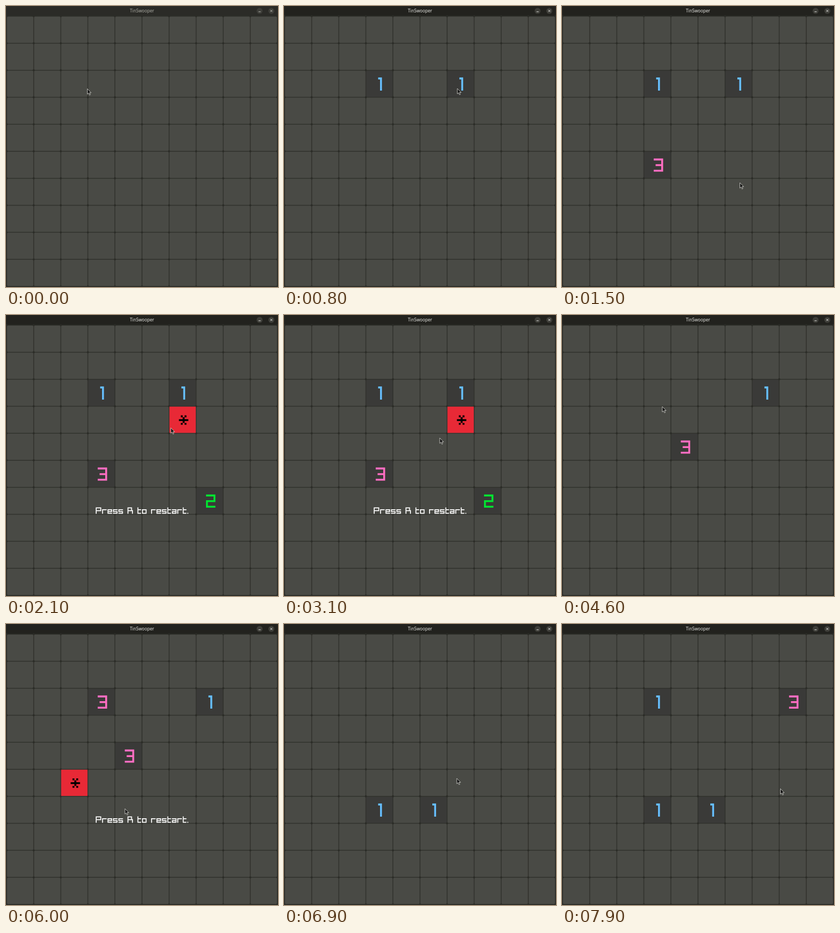
An HTML page for the animation above (8 s loop, 510 px wide and 528 px high).

```html
<!DOCTYPE html>
<html lang="en">
<head>
<meta charset="utf-8">
<title>TinSwooper</title>
<style>
  html, body { margin: 0; width: 100%; height: 100%; overflow: hidden; background: #22221e; }
  svg { display: block; width: 510px; height: 528px; }
  #bar { fill: #22221e; }
  #name { font: 500 8.2px "Open Sans", "Noto Sans", sans-serif; fill: #f4f4f0; text-anchor: middle; }
  .knob { fill: #3d3d38; }
  .mark { stroke: #f0f0ec; stroke-width: .95; fill: none; }
  .idle #bar { fill: #2b2b27; }
  .idle #name { fill: #b4b4ac; }
  .idle .mark { stroke: #c4c4bc; }
</style>
</head>
<body>
<svg id="stage" viewBox="0 0 510 528">
  <rect id="bar" width="510" height="19"/>
  <text id="name" x="255" y="11.9">TinSwooper</text>
  <circle class="knob" cx="475.5" cy="9.2" r="5.6"/>
  <circle class="knob" cx="497.5" cy="9.2" r="5.6"/>
  <path class="mark" d="M473.5 10.8h4M495.6 7.3l3.8 3.8m0-3.8l-3.8 3.8"/>
  <rect x="1.2" y="19.2" width="507.6" height="507.6" fill="#494a45"/>
  <g id="cells"></g>
  <g id="grid"></g>
  <g id="mines"></g>
  <g id="prompt" fill="#fff" role="img" aria-label="Press R to restart."></g>
  <path id="cursor" d="M0 0v10.2l2.3-2.1 1.7 3.7 1.7-.7-1.7-3.6h3.2z" fill="#141414" stroke="#deded8" stroke-width=".8" stroke-linejoin="round"/>
</svg>
<script>
const LOOP = 8000, STEP = 100, PITCH = 50.76, LEFT = 1.2, TOP = 19.2;
const $ = id => document.getElementById(id);

// Pixel glyphs: rows from the top, "#" is a filled pixel.
const GLYPHS = {
  '1': '## .# .# .# .# .# .#',
  '2': '##### ....# ....# ##### #.... #.... #####',
  '3': '##### ....# ....# .#### ....# ....# #####',
  '*': '..... .#.#. ..#.. ##### ..#.. .#.#.',
  'P': '###### #....# #....# ###### #..... #..... #.....',
  'R': '#####. #...#. #...#. ###### #....# #....# #....#',
  'r': '..... ..... ##### #.... #.... #.... #....',
  'e': '..... ..... ##### #...# ##### #.... #####',
  's': '..... ..... ##### #.... ##### ....# #####',
  't': '#... #... #### #... #... #... ####',
  'o': '..... ..... ##### #...# #...# #...# #####',
  'a': '..... ..... ##### ....# ##### #...# #####',
  '.': '. . . . . . #',
  ' ': '...'
};
const INK = { '1': '#66bfff', '2': '#00e430', '3': '#ff6dc2', '*': '#000' };

function add(parent, tag, attrs) {
  const el = document.createElementNS('http://www.w3.org/2000/svg', tag);
  for (const key in attrs) el.setAttribute(key, attrs[key]);
  return parent.appendChild(el);
}

// Path of a glyph, one subpath per run of pixels.
function glyphPath(char, x, y, px) {
  let d = '';
  GLYPHS[char].split(' ').forEach((row, j) => {
    for (const run of row.matchAll(/#+/g)) {
      const w = run[0].length * px;
      d += `M${x + run.index * px} ${y + j * px}h${w}v${px + .05}h${-w}z`;
    }
  });
  return d;
}

function drawGrid() {
  const grid = $('grid'), size = PITCH * 10;
  let d = '', dots = '';
  for (let i = 0; i <= 10; i++) {
    d += `M${LEFT + i * PITCH} ${TOP}v${size}M${LEFT} ${TOP + i * PITCH}h${size}`;
    for (let j = 0; j <= 10; j++) dots += `M${LEFT + i * PITCH} ${TOP + j * PITCH}h0`;
  }
  add(grid, 'path', { d, stroke: '#31322d', 'stroke-width': 1.5 });
  add(grid, 'path', { d: dots, stroke: '#2b2c27', 'stroke-width': 3.8, 'stroke-linecap': 'round' });
}

function drawPrompt() {
  const px = 1.7;
  let x = 168.3, d = '';
  for (const char of 'Press R to restart.') {
    d += glyphPath(char, x, 361.6, px);
    x += (GLYPHS[char].split(' ')[0].length + 1) * px;
  }
  add($('prompt'), 'path', { d });
}

// column, row, content, shown from, shown until
const OPENED = [
  [3, 2, '1', 300, 3300], [6, 2, '1', 800, 3300], [3, 5, '3', 1200, 3300],
  [7, 6, '2', 1700, 3300], [6, 3, '*', 2000, 3300],
  [4, 4, '3', 3900, 6300], [7, 2, '1', 4300, 6300], [3, 2, '3', 4700, 6300],
  [2, 5, '*', 5200, 6300],
  [3, 6, '1', 6500, LOOP], [5, 6, '1', 6800, LOOP],
  [8, 2, '3', 7200, LOOP], [3, 2, '1', 7500, LOOP]
];

// time, x, y of the pointer
const TRACK = [
  [0, 152.5, 155.5], [300, 179, 151], [600, 262, 156], [800, 325, 155], [900, 308, 173],
  [1200, 182, 296], [1300, 205, 306], [1500, 333.5, 332], [1700, 379, 343], [1800, 354, 288],
  [2000, 322, 201], [2100, 309, 212], [2300, 292, 231], [3300, 292, 231],
  [3700, 263, 244.5], [3900, 236, 248], [4300, 378, 152], [4600, 188, 172],
  [4700, 177, 160], [5000, 159, 252], [5200, 130, 300], [5600, 223, 347],
  [6300, 223, 347], [6500, 187, 350], [6800, 277, 346], [7100, 418, 178],
  [7200, 424, 156], [7500, 188, 148], [7600, 214, 174], [7900, 409.5, 309.5], [LOOP, 440, 335]
];

function openCell([col, row, char, from, to]) {
  const mine = char === '*', x = LEFT + col * PITCH, y = TOP + row * PITCH;
  const g = add($(mine ? 'mines' : 'cells'), 'g', {});
  const pad = mine ? .7 : 0;
  add(g, 'rect', {
    x: x + pad, y: y + pad, width: PITCH - 2 * pad, height: PITCH - 2 * pad,
    fill: mine ? '#e82936' : '#3a3a38'
  });
  add(g, 'path', { d: glyphPath(char, x + (char === '1' ? 23.1 : 18.5), y + 13.6, 3.52), fill: INK[char] });
  return { g, from, to };
}

function show(el, on) { el.style.visibility = on ? 'visible' : 'hidden'; }

function pointerAt(t) {
  const i = TRACK.findIndex(p => p[0] > t);
  const [t0, x0, y0] = TRACK[i - 1], [t1, x1, y1] = TRACK[i];
  const k = (t - t0) / (t1 - t0);
  return [x0 + (x1 - x0) * k, y0 + (y1 - y0) * k];
}

drawGrid();
drawPrompt();
const cells = OPENED.map(openCell);
const start = performance.now();

function render(now) {
  const t = Math.floor(Math.max(0, now - start) % LOOP / STEP) * STEP;
  for (const { g, from, to } of cells) show(g, t >= from && t < to);
  show($('prompt'), (t >= 2000 && t < 3300) || (t >= 5200 && t < 6300));
  $('stage').classList.toggle('idle', t < 300);
  $('cursor').setAttribute('transform', `translate(${pointerAt(t)})`);
  requestAnimationFrame(render);
}
render(start);
</script>
</body>
</html>
```
